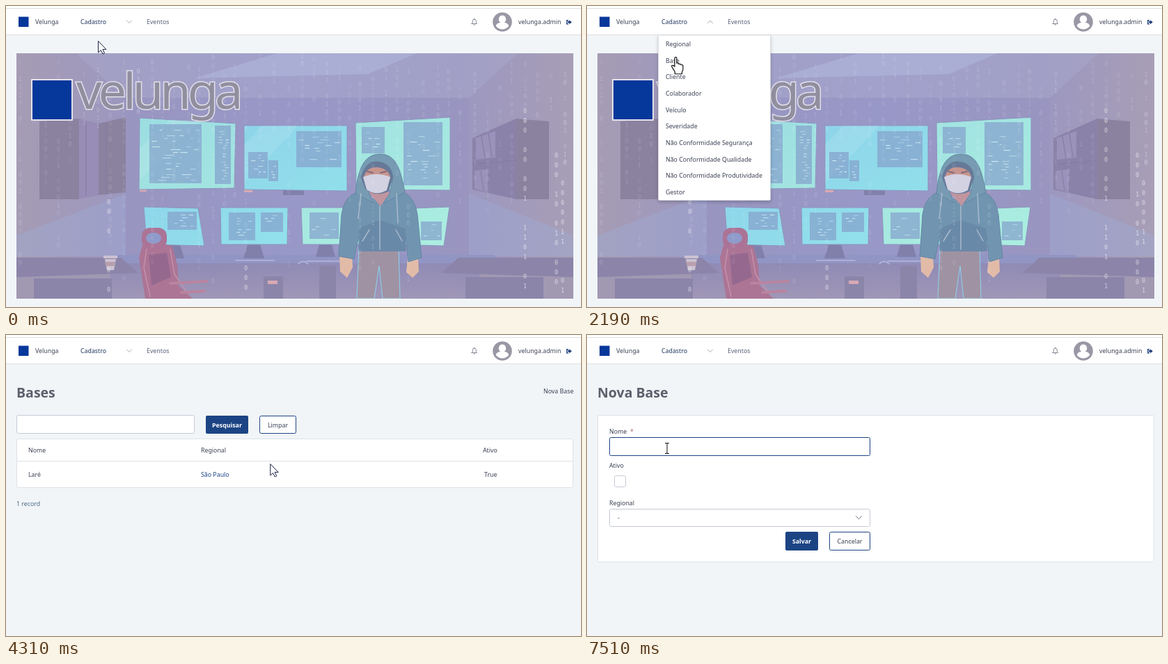
An HTML page for the animation above (8000 ms loop, 826 px wide and 433 px high).

```html
<!DOCTYPE html>
<html lang="pt">
<head>
<meta charset="utf-8">
<title>Cadastro</title>
<style>
html, body { margin: 0; width: 100%; height: 100%; overflow: hidden; background: #f1f5f8; }
svg { display: block; width: 826px; height: 433px; font: 8.8px "Noto Sans", "Open Sans", sans-serif; fill: #3b4054; }
.line { fill: none; stroke-linecap: round; stroke-linejoin: round; }
.title { font-size: 19.5px; font-weight: 600; fill: #5d606c; }
.field { fill: #fff; stroke: #c6cad3; }
.card { fill: #fff; stroke: #dde2e7; }
.primary { fill: #1c4484; }
.outline { fill: #fff; stroke: #1c4484; }
.center { text-anchor: middle; }
.label { fill: #fff; font-weight: 700; text-anchor: middle; }
.wordmark { font-size: 72px; letter-spacing: -5px; fill: #918f9f; stroke: #e2e0ea; stroke-width: 3px; paint-order: stroke; }
.rain { font: 8.5px "DejaVu Sans Mono", monospace; fill: #fff; }
</style>
</head>
<body>
<svg viewBox="0 0 826 433">
  <defs>
    <linearGradient id="wall">
      <stop offset="0" stop-color="#a59cb4"/><stop offset=".2" stop-color="#9c97c0"/>
      <stop offset=".5" stop-color="#9a9aca"/><stop offset=".8" stop-color="#9c97c0"/>
      <stop offset="1" stop-color="#a79eb6"/>
    </linearGradient>
    <linearGradient id="floor" x2="0" y2="1">
      <stop offset="0" stop-color="#908bb6"/><stop offset="1" stop-color="#a097b6"/>
    </linearGradient>
    <linearGradient id="cyan" x2="1" y2="1">
      <stop offset="0" stop-color="#8ccfe9"/><stop offset="1" stop-color="#93e4ec"/>
    </linearGradient>
    <linearGradient id="mint" x2="1" y2="1">
      <stop offset="0" stop-color="#9cdde2"/><stop offset="1" stop-color="#abeee0"/>
    </linearGradient>
    <clipPath id="sceneClip"><path d="M15 68h800v353H15z"/></clipPath>
    <filter id="shadow" x="-10%" y="-10%" width="120%" height="120%">
      <feDropShadow dx="0" dy="2" stdDeviation="2.5" flood-opacity=".22"/>
    </filter>
  </defs>

  <g id="home" clip-path="url(#sceneClip)">
    <path fill="url(#wall)" d="M15 68h800v353H15z"/>
    <path fill="#a9a8cc" opacity=".45" d="M100 68H735L665 132H170z"/>
    <path fill="#b3bce0" opacity=".45" d="M390 68H590L520 98 270 104z"/>
    <path fill="#918ec0" opacity=".25" d="M170 132H665V358H170z"/>
    <path fill="#9db0df" opacity=".3" d="M15 330L172 270V360H15zM815 330L665 270V360H815z"/>
    <path fill="#8a829f" d="M48 166L105 162V278H48zM133 169L172 160V268L133 272zM733 162L780 166V278H733z"/>
    <path fill="#978db6" d="M105 162L133 169V272L105 278z"/>
    <path fill="#8a82a8" d="M670 190L733 162V278L670 264z"/>
    <path fill="#9a92ba" d="M675 190l28-10v38l-28 3zM673 237l19-2v33l-19-5z"/>
    <path class="line" stroke="#827ba0" d="M670 228L733 222M683 187l5 32M693 184l5 33M682 237l4 28M115 168v104M144 168v102"/>
    <path fill="#9195c4" d="M160 358H700L720 370H140z"/>
    <path fill="url(#floor)" d="M150 370H710V421H150z"/>
    <path fill="#a198b2" d="M15 385H150V421H15zM680 385H815V421H680z"/>
    <path fill="#8c85a9" d="M15 362H165L190 384 15 390zM815 362H650L625 384 815 390z"/>
    <path fill="#8b85aa" d="M40 392h112v29H40zM660 390h112v31H660zM370 389h28v32h-28zM450 374h24v47h-24z"/>
    <path fill="#8080ab" d="M234 343h16l6 20h-28zM347 343h18l6 20h-30zM450 343h18l5 18h-28zM398 264h30v8h-30z"/>
    <path fill="#d7a9b3" d="M376 395h14v5h-14zM342 264h12v4h-12zM192 263h10v4h-10z"/>

    <g stroke="#8d94bd">
      <path fill="url(#mint)" d="M192 161L330 169 328 262 191 264zM638 160L502 168 503 264 638 265zM424 290H520V343H426zM560 292L637 289 629 345 556 343z"/>
      <path fill="url(#cyan)" d="M342 172H490V266L342 264zM198 289L276 291 285 345 202 343zM308 290H405L404 343H309z"/>
    </g>
    <path fill="#fff" opacity=".1" d="M342 200L368 172H420L342 255zM192 205L235 164H280L192 250z"/>
    <g id="windows" fill="#86a4cd" opacity=".75"></g>
    <g id="codeLines" fill="#dff6fb"></g>

    <path fill="#ac7595" d="M196 344L191 362 200 421H268L248 402 246 372 239 346Q217 337 196 344z"/>
    <path fill="#95698f" d="M205 358L231 355 237 390 209 402z"/>
    <path class="line" stroke="#c491ab" stroke-width="1.500" d="M202 350L198 376 207 418M236 350L242 386 262 414"/>
    <rect x="195" y="319" width="36" height="30" rx="12" fill="#ab7496"/>
    <ellipse cx="212" cy="334" rx="11" ry="8" fill="#8f9bcb"/>
    <path class="line" stroke="#b984a0" stroke-width="4" d="M236 399L289 396M252 412L285 410"/>
    <path fill="#cbc2d2" d="M140 359h20v4h-20zM142 364h16l-3 16h-10z"/>
    <path fill="#b99fae" d="M142 368h15l-1 6h-12z"/>
    <path class="line" stroke="#b9b7dc" stroke-width="1.500" d="M330 366h55M432 367h52M420 371q6-7 14 0"/>

    <path fill="#9f92a3" stroke="#8ed3eb" d="M507 348H564L566 421H541L536 374 529 421H504z"/>
    <path fill="#e2bba8" d="M479 358h18l1 18-8 15-10-9zM577 362h15l1 20-9 9-9-8z"/>
    <path fill="#7195b0" stroke="#6585a6" d="M503 268Q485 276 482 300L478 360 500 364 507 330V352H574V330L578 368 597 362 591 300Q588 276 570 267Q537 290 503 268z"/>
    <path fill="#6989a8" d="M507 320L536 308 574 320V353H507z"/>
    <path fill="#c0959f" d="M521 268h31l-14 20z"/>
    <path fill="#769bb2" stroke="#6585a4" d="M537 213C512 213 505 240 502 270L527 283 519 262 510 247Q516 222 535 224Q554 226 556 247L551 270 542 284 573 268C567 238 562 213 537 213z"/>
    <path fill="#677998" d="M510 247Q516 222 535 224Q554 226 556 247L550 266Q532 276 516 263z"/>
    <path fill="#c6958f" d="M514 247Q517 231 534 232Q550 234 552 247L546 263H520z"/>
    <path fill="#d3d2e2" d="M513 246Q532 238 552 246L547 265Q532 274 518 264z"/>
    <path class="line" stroke="#866979" stroke-width="2" d="M519 238l8 2M538 240l8-2"/>
    <path class="line" stroke="#a9bacd" stroke-width="1.500" d="M510 270L506 306M561 270L563 312M537 288V350M512 338l10-16M569 338l-9-16"/>
    <g id="rain" class="rain"></g>

    <rect x="37" y="106" width="58" height="58" fill="#06379b" stroke="#e2e0ea" stroke-width="2"/>
    <text class="wordmark" x="101" y="148">velunga</text>
  </g>

  <g id="list">
    <text class="title" x="15" y="90">Bases</text>
    <text x="772" y="84">Nova Base</text>
    <rect class="field" x="15.5" y="115.5" width="255" height="26" rx="2"/>
    <rect class="primary" x="287" y="116" width="61" height="26" rx="2"/>
    <text class="label" x="317.5" y="133">Pesquisar</text>
    <rect class="outline" x="364.5" y="116.5" width="52" height="25" rx="2"/>
    <text class="center" x="390.5" y="133">Limpar</text>
    <rect class="card" x="15.5" y="149.5" width="799" height="70" rx="2"/>
    <path class="line" stroke="#dde2e7" d="M16 181.5h798"/>
    <text x="32" y="169">Nome</text><text x="280" y="169">Regional</text><text x="685" y="169">Ativo</text>
    <text id="nameCell" x="32" y="204">Laré</text>
    <text id="regionCell" x="280" y="204">São Paulo</text>
    <text x="687" y="204">True</text>
    <text x="15" y="246" fill="#4e6b85">1 record</text>
  </g>

  <g id="form">
    <text class="title" x="15" y="90">Nova Base</text>
    <rect class="card" x="15.5" y="115.5" width="799" height="211" rx="2"/>
    <text x="32" y="142">Nome <tspan x="62" fill="#a56f7b">*</tspan></text>
    <rect id="nameField" class="field" x="32.5" y="147.5" width="374" height="26" rx="2"/>
    <path id="caret" stroke="#222" d="M44.5 155v12"/>
    <text x="32" y="191">Ativo</text>
    <rect class="field" x="39.5" y="202.5" width="16" height="16" rx="2"/>
    <text x="32" y="245">Regional</text>
    <rect class="field" x="32.5" y="250.5" width="374" height="25" rx="2"/>
    <text x="44" y="266">-</text>
    <path class="line" stroke="#777b88" d="M386.5 260.5l4 4.5 4-4.5"/>
    <rect class="primary" x="285" y="283" width="47" height="27" rx="2"/>
    <text class="label" x="308.5" y="300">Salvar</text>
    <rect class="outline" x="348.5" y="283.5" width="58" height="26" rx="2"/>
    <text class="center" x="377.5" y="300">Cancelar</text>
  </g>

  <g id="header">
    <path fill="#fff" d="M0 0h826v41H0z"/>
    <path class="line" stroke="#dedfe1" d="M0 3.5h826M0 41.5h826"/>
    <path fill="#06379b" d="M18 15.5h14.5v14.5H18z"/>
    <text x="42" y="26">Velunga</text>
    <text x="107" y="26" fill="#1f355f">Cadastro</text>
    <path id="chevron" class="line" d="M173.5 21l3.5 3.5 3.5-3.5"/>
    <text x="202" y="26" fill="#596078">Eventos</text>
    <path id="underline" fill="#1c4484" d="M102 40h85v1.5h-85z"/>
    <path class="line" stroke="#777b88" stroke-width=".9" d="M669 25.5h7.5l-1.2-1.8v-2.2a2.5 2.5 0 0 0-5 0v2.2zM672 27h1.5M672.8 19v-1"/>
    <circle cx="713" cy="23" r="13.8" fill="#9a97a5"/>
    <path fill="#fff" d="M713 13.5a5.3 5.6 0 0 1 2.8 10.3c4 .8 6 2.4 6.500 5a11.500 11.500 0 0 1-18.600 0c.5-2.600 2.500-4.200 6.500-5A5.300 5.600 0 0 1 713 13.500z"/>
    <text x="736" y="26">velunga.admin</text>
    <path fill="#1d3d7b" d="M808 20h-3v6.5h3v-1.2h-1.7v-4h1.7zM809 20.2l3.8 3-3.8 3v-1.9h-2v-2.300h2z"/>
  </g>

  <g id="menu">
    <rect x="102.5" y="42" width="161" height="237.5" rx="2" fill="#fff" stroke="#d4d6dc" stroke-width=".7" filter="url(#shadow)"/>
  </g>

  <circle id="click" r="12" fill="#ff0" opacity=".47"/>
  <g id="pointer" stroke-linejoin="round">
    <path id="arrow" fill="#fff" stroke="#1b2140" d="M.5.5V17l3.8-3.5 2.7 5.5 2.5-1.2-2.6-5.4h5z"/>
    <path id="hand" fill="#fff" stroke="#111" stroke-width="1.2" d="M-1.5 14V1.8a1.500 1.500 0 0 1 3 0V9c2.500-1 3 .3 3 1.500 2-1 3 0 3 1 2-.7 3 .3 3 1.500v5c0 2-1.500 3-1.500 4.500v2H-1V22c-1-3-4.300-6.500-4.800-8.500-.3-2 2.300-2 4.300.5z"/>
    <path id="beam" class="line" stroke="#111" d="M-2.5-7.5H-1L0-7 1-7.5H2.5M0-7V7M-2.5 7.5H-1L0 7 1 7.5H2.5"/>
  </g>
</svg>
<script>
const $ = id => document.getElementById(id);
const between = (v, a, b) => v >= a && v < b;
const show = (id, on) => { $(id).style.display = on ? '' : 'none'; };

let seed = 11;
const random = () => (seed = seed * 16807 % 2147483647) / 2147483647;

// Editor windows on the monitors: x, y, width, height
const windows = [
  [206, 170, 75, 85], [300, 172, 23, 84], [348, 210, 28, 38], [377, 222, 14, 30],
  [417, 180, 65, 52], [511, 174, 33, 38], [571, 167, 56, 91], [232, 296, 42, 26],
  [320, 297, 38, 40], [366, 297, 32, 28], [436, 297, 42, 38], [596, 310, 30, 27]
];
let panes = '', lines = '';
for (const [x, y, w, h] of windows) {
  panes += `<rect x="${x}" y="${y}" width="${w}" height="${h}"/>`;
  for (let row = y + 4; row < y + h - 4; row += 4) {
    if (random() < .35) continue;
    let left = x + 3 + random() * w * .5;
    while (left < x + w - 6) {
      const length = Math.min(3 + random() * w * .15, x + w - 3 - left);
      lines += `<rect x="${left}" y="${row}" width="${length}" height="1.2" opacity="${.3 + random() * .5}"/>`;
      left += length + 3 + random() * w * .5;
    }
  }
}
$('windows').innerHTML = panes;
$('codeLines').innerHTML = lines;

let digits = '';
for (let x = 18; x < 812; x += 14 + random() * 8) {
  const bright = random() < .15 ? .5 : .22;
  const end = 160 + random() * 270;
  for (let y = 74 + random() * 50; y < end; y += 11.5) {
    if (random() < .7)
      digits += `<text x="${x}" y="${y}" opacity="${bright * (.35 + random() * .65)}">${random() < .65 ? 0 : 1}</text>`;
  }
}
for (const [x, top] of [[145, 271], [342, 380], [743, 140], [788, 190], [797, 202]])
  for (let y = top; y < 418; y += 14)
    if (random() < .65) digits += `<text x="${x}" y="${y}" opacity=".6">${random() < .7 ? 0 : 1}</text>`;
$('rain').innerHTML = digits;

const items = ['Regional', 'Base', 'Cliente', 'Colaborador', 'Veículo', 'Severidade', 'Não Conformidade Segurança',
  'Não Conformidade Qualidade', 'Não Conformidade Produtividade', 'Gestor'];
$('menu').innerHTML += items.map((item, i) => `<text x="113" y="${58 + i * 23.65}">${item}</text>`).join('');

// Pointer path: time, x, y
const path = [
  [0, 132, 50], [50, 132, 50], [320, 147, 24], [1420, 147, 24], [1490, 147, 27], [1850, 142, 44],
  [2270, 124, 80], [2340, 124, 77], [2890, 124, 77], [2900, 125, 77], [3700, 125, 77], [4050, 200, 180],
  [4250, 330, 185], [4540, 564, 185], [4680, 660, 165], [4900, 750, 115], [5150, 799, 83], [5310, 799.5, 78],
  [5770, 799.5, 78], [5780, 801, 78], [6080, 801, 78], [6200, 720, 90], [6500, 330, 135], [6780, 115, 163],
  [8000, 115, 163]
];
const clicks = [[700, 780], [2510, 2580], [5530, 5620], [6950, 7030]];

function pointerAt(t) {
  const i = path.findIndex(key => key[0] > t);
  const [t0, x0, y0] = path[i - 1], [t1, x1, y1] = path[i];
  const k = (t - t0) / (t1 - t0);
  return [x0 + (x1 - x0) * k, y0 + (y1 - y0) * k];
}

function draw() {
  const t = performance.now() % 8000;
  const [x, y] = pointerAt(t);
  const page = t < 3220 ? 'home' : t < 6080 ? 'list' : 'form';
  for (const id of ['home', 'list', 'form']) show(id, id === page);

  const menuOpen = page === 'home' ? Math.max(0, Math.min(1, (t - 780) / 300)) : 0;
  const eased = 1 - (1 - menuOpen) ** 2;
  show('menu', menuOpen > 0);
  $('menu').setAttribute('opacity', eased);
  $('menu').setAttribute('transform', `translate(0 ${42 * (1 - eased) * .2}) scale(1 ${.8 + .2 * eased})`);

  const tabHover = page === 'home' && y < 42;
  show('underline', tabHover);
  $('chevron').setAttribute('stroke', tabHover ? '#333a4c' : '#a5a8b0');
  $('chevron').setAttribute('transform', `rotate(${-180 * eased} 177 22.8)`);

  const rowHover = page === 'list' && between(y, 182, 219);
  $('nameCell').setAttribute('fill', rowHover && x < 264 ? '#1c4484' : '#3b4054');
  $('regionCell').setAttribute('fill', rowHover && between(x, 264, 668) ? '#1c4484' : '#3b4054');

  const inField = page === 'form' && between(x, 32, 407) && between(y, 147, 175);
  $('nameField').style.stroke = inField ? '#1c4484' : '';
  show('caret', between(t, 7030, 7510));

  const onLink = between(t, 1900, 3050) || page === 'list' && x > 770 && y < 95 || between(t, 6080, 6150);
  const shape = inField ? 'beam' : onLink ? 'hand' : 'arrow';
  for (const id of ['arrow', 'hand', 'beam']) show(id, id === shape);
  $('pointer').setAttribute('transform', `translate(${x} ${y})`);

  show('click', clicks.some(([from, to]) => between(t, from, to)));
  $('click').setAttribute('transform', `translate(${x} ${y})`);
  requestAnimationFrame(draw);
}
draw();
</script>
</body>
</html>
```
